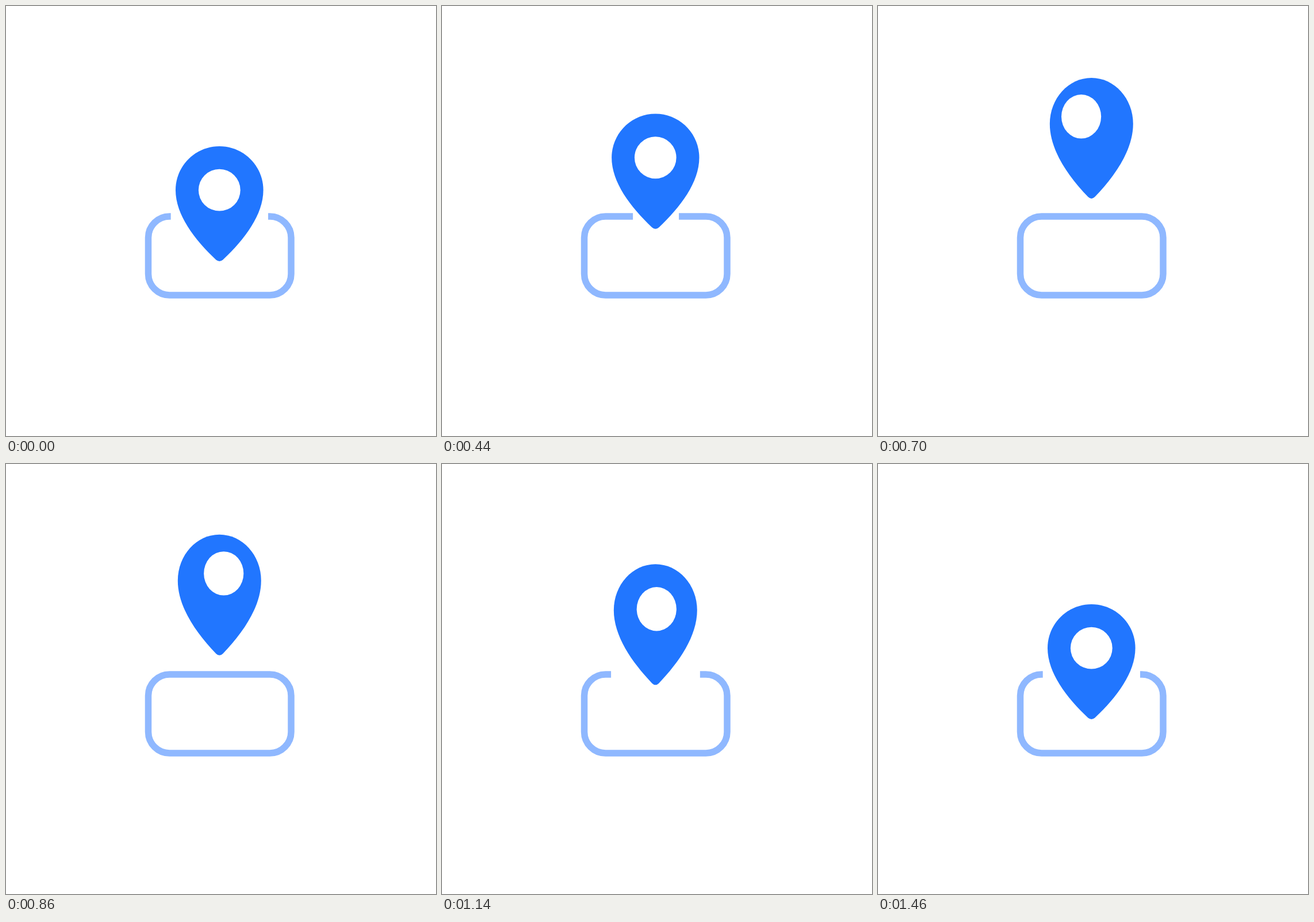
Recreate the animation shown at these times as an HTML page. Size 748 by 748 pixels, loop 2.4 s.

```html
<!DOCTYPE html>
<html lang="en">
<head>
<meta charset="utf-8">
<title>Map pin</title>
<style>
  html, body { margin: 0; width: 100%; height: 100%; overflow: hidden; background: #fff; }
  svg { display: block; width: 100%; height: 100%; }

  .frame, .pin, .hole {
    --in-out: cubic-bezier(.65, 0, .35, 1);
    --soft: cubic-bezier(.4, 0, .6, 1);
    animation: 2400ms linear infinite;
  }
  .frame {
    fill: none; stroke: #8fb8ff; stroke-width: 11.5;
    animation-name: gap;
  }
  .pin {
    fill: #2176ff;
    transform-box: view-box; transform-origin: 371.3px 344px;
    animation-name: jump, stretch;
  }
  .hole { fill: #fff; animation-name: look; }

  /* The top edge closes once the pin has left and opens before it lands. */
  @keyframes gap {
    0%, 14.167% { stroke-dasharray: 0 83.7 537.8 999; animation-timing-function: var(--in-out); }
    27.917%, 38.417% { stroke-dasharray: 0 0 708 999; animation-timing-function: var(--in-out); }
    52.5%, 100% { stroke-dasharray: 0 83.7 537.8 999; }
  }
  @keyframes jump {
    0%, 6.667% { translate: 0 0; animation-timing-function: var(--soft); }
    14.167% { translate: 0 10.5px; animation-timing-function: cubic-bezier(.2, .48, .3, 1); }
    33.333% { translate: 0 -116.5px; animation-timing-function: cubic-bezier(.3333, 0, .6667, 0); }
    52.5% { translate: 0 10.5px; animation-timing-function: var(--soft); }
    60.833%, 100% { translate: 0 0; }
  }
  @keyframes stretch {
    0%, 6.667% { scale: 1 1; animation-timing-function: var(--soft); }
    14.167% { scale: 1.08 .92; animation-timing-function: cubic-bezier(.3333, 1, .6667, 1); }
    29.167%, 51.583% { scale: .95 1.05; }
    52.5% { scale: 1.08 .92; animation-timing-function: var(--soft); }
    60.833%, 100% { scale: 1 1; }
  }
  @keyframes look {
    0%, 18.333% { translate: 0 0; animation-timing-function: var(--in-out); }
    29.167% { translate: -18.7px -12px; animation-timing-function: var(--in-out); }
    41.667% { translate: 13px -11.8px; animation-timing-function: var(--in-out); }
    52.5%, 100% { translate: 0 0; }
  }
</style>
</head>
<body>
<svg viewBox="0 0 748 748">
  <path class="frame" d="M372.3 366H459a37 37 0 0 1 37 37V466a37 37 0 0 1-37 37H284.5a37 37 0 0 1-37-37V403a37 37 0 0 1 37-37H372.3"/>
  <g class="pin">
    <path d="M371.3 244C413.4 244 447.6 278.2 447.6 320.3C447.6 363 415 406 377.5 441.3Q371.3 446.8 365.1 441.3C327.6 406 295 363 295 320.3C295 278.2 329.2 244 371.3 244Z"/>
    <circle class="hole" cx="371.3" cy="320.2" r="36.4"/>
  </g>
</svg>
</body>
</html>
```
